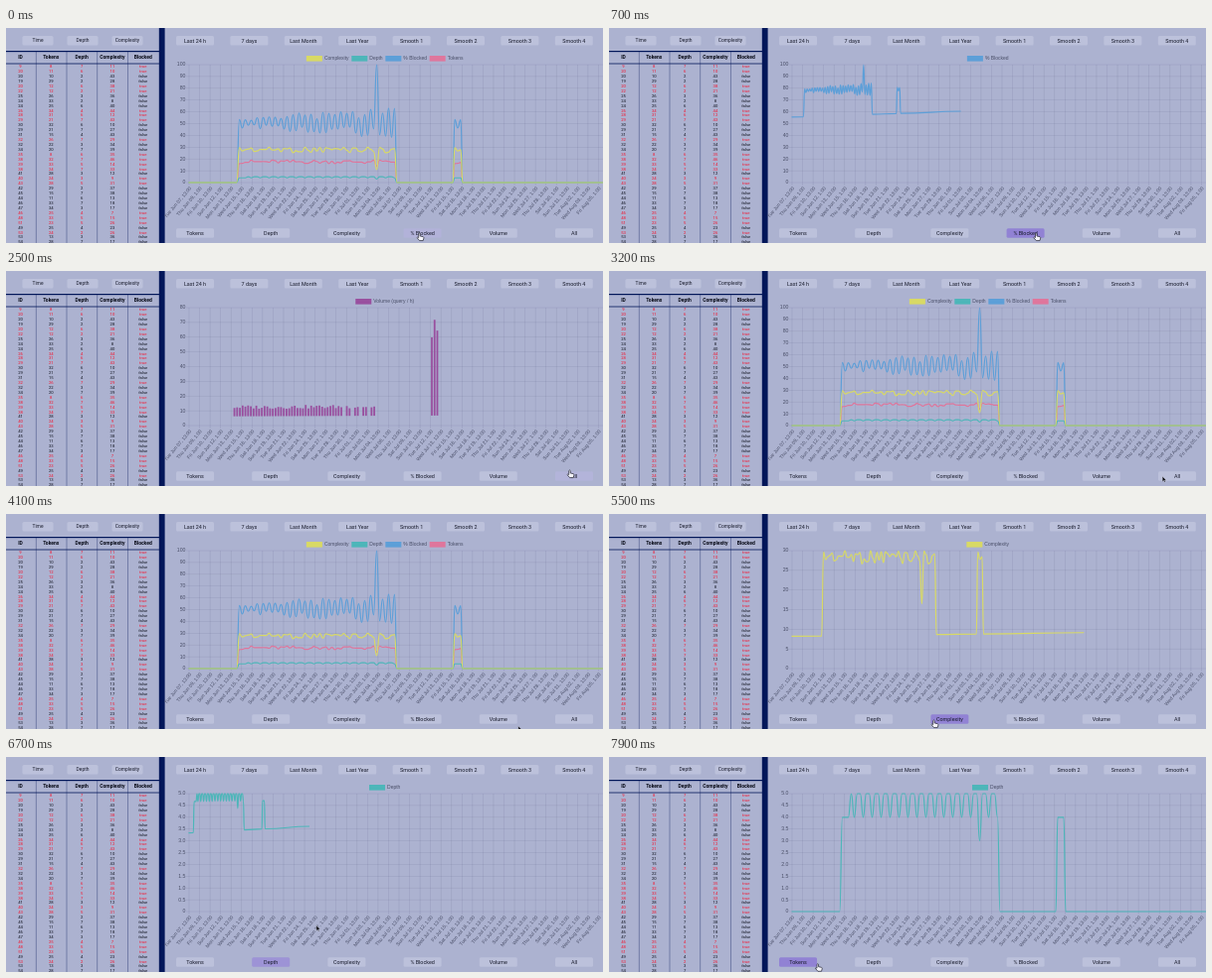
Animation, 600 px wide and 217 px high, one loop 8000 ms. Source, as an HTML page with a canvas:

```html
<!DOCTYPE html>
<html lang="en">
<head>
<meta charset="utf-8">
<style>
html, body { margin: 0; width: 100%; height: 100%; overflow: hidden; background: #acb2d0; }
canvas { display: block; }
</style>
</head>
<body>
<canvas id="stage" width="600" height="217"></canvas>
<script>
const g = document.getElementById('stage').getContext('2d');
const LOOP = 8000;
const INK = '#171a2b', FAINT = '#4a4f68', NAVY = '#021659';
const ROBOTO = 'Roboto, sans-serif';
const ARIAL = '"Liberation Sans", Arial, sans-serif';
const AREA = { left: 184, right: 600, top: 37, bottom: 156 };
const HEIGHT = AREA.bottom - AREA.top;
const ORIGIN = 168; // points fly in from the left edge of the chart

const clamp = v => Math.max(0, Math.min(1, v));
const ease = t => 1 - (1 - clamp(t)) ** 4;
const rand = (i, k) => {
  const v = Math.sin(i * 12.9898 + k * 78.233) * 43758.5453;
  return v - Math.floor(v);
};
const between = (lo, hi, i, k) => lo + Math.floor(rand(i, k) * (hi - lo + 1));
const list = (n, fn) => Array.from({ length: n }, (_, i) => fn(i));

function text(str, x, y, font, color = INK, align = 'center') {
  g.font = font;
  g.fillStyle = color;
  g.textAlign = align;
  g.textBaseline = 'middle';
  g.fillText(str, x, y);
}

function rect(x, y, w, h, color) {
  g.fillStyle = color;
  g.fillRect(x, y, w, h);
}

function button(label, cx, cy, w, size, heat = 0) {
  const mix = (a, b) => Math.round(a + (b - a) * heat);
  g.fillStyle = `rgb(${mix(188, 145)},${mix(193, 130)},${mix(219, 212)})`;
  g.beginPath();
  g.roundRect(cx - w / 2, cy - 4.7, w, 9.4, 1.5);
  g.fill();
  text(label, cx, cy + .3, `${size}px ${ROBOTO}`);
}

// Table
const blockedRows = 'ttffttffftttffftffttttfttffffftttftff'.split('').map(c => c === 't');
const rows = blockedRows.map((blocked, i) => [
  i ? 16 + i + between(0, 3, i, 4) : 9,
  between(7, 34, i, 5), between(2, 7, i, 6), between(6, 46, i, 7), blocked
]);
const columnX = c => 14.5 + 30.8 * c;

function drawTable() {
  ['Time', 'Depth', 'Complexity'].forEach((s, i) => button(s, 32 + 45 * i, 12.7, 31, 4.9));
  for (let c = 1; c < 5; c++) rect(columnX(c) - 15.4, 24, .6, 193, '#4a568a');
  rect(0, 23, 154, 1.2, NAVY);
  rect(0, 35.6, 154, .8, NAVY);
  ['ID', 'Tokens', 'Depth', 'Complexity', 'Blocked'].forEach((s, c) =>
    text(s, columnX(c), 29.8, `bold 5px ${ROBOTO}`, '#050814'));
  rows.forEach((row, i) => row.forEach((cell, c) =>
    text(cell, columnX(c), 39 + i * 4.92, `4.2px ${ROBOTO}`, row[4] ? '#f5142d' : '#10131f')));
  rect(153.8, 0, 5.8, 217, NAVY);
}

// Series: a busy stretch of samples three pixels apart, then a short burst
const BUSY = 53, SPIKE = 46;

function series(level) {
  return [[150, 0], [231.8, 0], ...list(BUSY, i => [234.5 + 3 * i, level(i)]), [393, 0],
    [449, 0], ...list(3, i => [451 + 3 * i, level(i)]), [459, 0], [600, 0]];
}

function blockedLevel(i) {
  if (i === SPIKE) return 100;
  const swing = (3 + .12 * i) * (.5 + rand(i, 8));
  return 51 + (i % 2 ? -swing : swing);
}

function depthLevel(i) {
  if (i === SPIKE) return 3;
  return i < 3 || i % 3 === 1 ? 4 : 5;
}

function volumeLevel(i) {
  const missing = i > 38 && i % 3 === 1;
  return missing ? 0 : 5.4 + 2.8 * rand(i, 3);
}

const sets = {
  Complexity: { color: '#d8d965', data: series(i => i === SPIKE ? 11 : 30 - 4.8 * rand(i, 1) ** 1.4) },
  Depth: { color: '#4db6b9', data: series(depthLevel) },
  '% Blocked': { color: '#5d9fd8', data: series(blockedLevel) },
  Tokens: { color: '#df769c', data: series(i => i === SPIKE ? 14 : 16 + 3.2 * rand(i, 2)) },
  'Volume (query / h)': {
    color: '#99509f',
    bars: true,
    data: [...list(BUSY, i => [235 + 3 * i, volumeLevel(i)]), [451, 58], [454, 71], [457, 63]]
  }
};

const all = ['Complexity', 'Depth', '% Blocked', 'Tokens'];
const scenes = [
  { at: -2000, names: all, max: 100, step: 10 },
  { at: 570, names: ['% Blocked'], max: 100, step: 10 },
  { at: 2035, names: ['Volume (query / h)'], max: 80, step: 10 },
  { at: 2520, names: all, max: 100, step: 10, span: 250 },
  { at: 5231, names: ['Complexity'], max: 30, step: 5 },
  { at: 6610, names: ['Depth'], max: 5, step: .5 }
];

function drawAxes({ max, step }) {
  const grid = 'rgba(20,25,70,.11)';
  for (let v = 0; v <= max; v += step) {
    const y = AREA.bottom - v / max * HEIGHT;
    rect(AREA.left - 3, y - .3, AREA.right - AREA.left + 3, .6, grid);
    text(step < 1 && v ? v.toFixed(1) : v, 180.5, y, `5.2px ${ARIAL}`, FAINT, 'right');
  }
  for (let i = 0; i < 40; i++) {
    const x = AREA.left + i * 10.55;
    rect(x - .3, AREA.top, .6, HEIGHT + 3, grid);
    const d = new Date(Date.UTC(2022, 5, 7, 13) + i * 36 * 3600e3);
    const [day, date, month] = d.toUTCString().split(/,? /);
    g.save();
    g.translate(x + 1.5, 161);
    g.rotate(-50 * Math.PI / 180);
    text(`${day} ${month} ${date}, ${d.getUTCHours()}:00`, 0, 0, `4.9px ${ARIAL}`, FAINT, 'right');
    g.restore();
  }
}

function drawLegend(names) {
  const font = `5px ${ARIAL}`, gap = 2.7;
  g.font = font;
  const widths = names.map(n => g.measureText(n).width + 18);
  let x = 380.7 - (widths.reduce((a, b) => a + b) + gap * (names.length - 1)) / 2;
  names.forEach((n, i) => {
    rect(x, 28, 16, 5.6, sets[n].color);
    text(n, x + 18, 31, font, FAINT, 'left');
    x += widths[i] + gap;
  });
}

function drawSet({ color, data, bars }, max, age, span) {
  const px = x => ORIGIN + (x - ORIGIN) * ease(age / span);
  const py = (x, v) => {
    const late = 20 * (x - AREA.left) / (AREA.right - AREA.left) - 7;
    return AREA.top + HEIGHT * (1 - v / max) * ease((age - late) / span);
  };
  if (bars) {
    for (const [x, v] of data) {
      const top = py(x, v);
      rect(px(x) - .9, top, 1.8, py(x, 0) - top, color);
    }
    return;
  }
  g.beginPath();
  let lastX, lastY;
  data.forEach(([x, v], i) => {
    const X = px(x), Y = py(x, v), mid = (lastX + X) / 2;
    if (i) g.bezierCurveTo(mid, lastY, mid, Y, X, Y);
    else g.moveTo(X, Y);
    lastX = X;
    lastY = Y;
  });
  g.strokeStyle = color;
  g.lineWidth = 1.2;
  g.lineJoin = 'round';
  g.stroke();
}

function drawChart(t) {
  const scene = scenes.findLast(s => s.at <= t);
  drawAxes(scene);
  drawLegend(scene.names);
  g.save();
  g.beginPath();
  g.rect(AREA.left - .5, AREA.top - 1, 420, HEIGHT + 2);
  g.clip();
  for (const n of [...scene.names].reverse())
    drawSet(sets[n], scene.max, t - scene.at, scene.span || 1000);
  g.restore();
}

// Buttons; each view is heated by the pointer between two times
const ranges = ['Last 24 h', '7 days', 'Last Month', 'Last Year', 'Smooth 1', 'Smooth 2', 'Smooth 3', 'Smooth 4'];
const views = [
  ['Tokens', 7650, 8200], ['Depth', 6250, 6660], ['Complexity', 4950, 5750],
  ['% Blocked', -35, 750], ['Volume', 1000, 2150], ['All', 2470, 3000]
];
const FADE = 150;
const viewX = i => 190 + 76.2 * i;

function drawButtons(t) {
  ranges.forEach((s, i) => button(s, 190 + 54.4 * i, 12.8, 38, 5.4));
  views.forEach(([s, from, to], i) =>
    button(s, viewX(i), 207, 38, 5.4, Math.min(clamp((t - from) / FADE), clamp(1 - (t - to) / FADE))));
}

// Pointer stops: time, x, y
const path = [[0, 415, 207], [600, 416, 207], [1200, 492, 207], [2050, 493, 207], [2500, 566, 201],
  [2900, 570, 205], [4100, 515, 214], [5000, 330, 208], [5750, 324, 208], [6300, 268, 207],
  [6610, 266, 206], [6700, 312, 170], [7700, 210, 208], [LOOP, 209, 209]];
const arrow = new Path2D('M0 0V5.4L1.3 4.2L2.2 6L3.1 5.6L2.2 3.9H3.9Z');
const hand = new Path2D('M-.3 .6Q.5-.6 1.2 .6V3L4.3 3.7Q5.1 4.1 4.9 5.1L4.2 7.6H.6L-2 4.6Q-1.6 3.6-.3 4.5Z');

function drawPointer(t) {
  const i = path.findIndex(p => p[0] > t);
  const [[t0, x0, y0], [t1, x1, y1]] = [path[i - 1], path[i]];
  const k = (t - t0) / (t1 - t0);
  const x = x0 + (x1 - x0) * k, y = y0 + (y1 - y0) * k;
  const over = views.some(([, from, to], n) =>
    t > from + 30 && t < to && Math.abs(x - viewX(n)) < 21);
  const shape = over ? hand : arrow;
  g.save();
  g.translate(x, y);
  g.fillStyle = over ? '#f4f4fa' : '#08090f';
  g.strokeStyle = over ? '#20222e' : '#d8dbea';
  g.lineWidth = over ? .7 : .4;
  g.fill(shape);
  g.stroke(shape);
  g.restore();
}

function frame(now) {
  const t = now % LOOP;
  rect(0, 0, 600, 217, '#acb2d0');
  drawTable();
  drawChart(t);
  drawButtons(t);
  drawPointer(t);
  requestAnimationFrame(frame);
}
requestAnimationFrame(frame);
</script>
</body>
</html>
```
